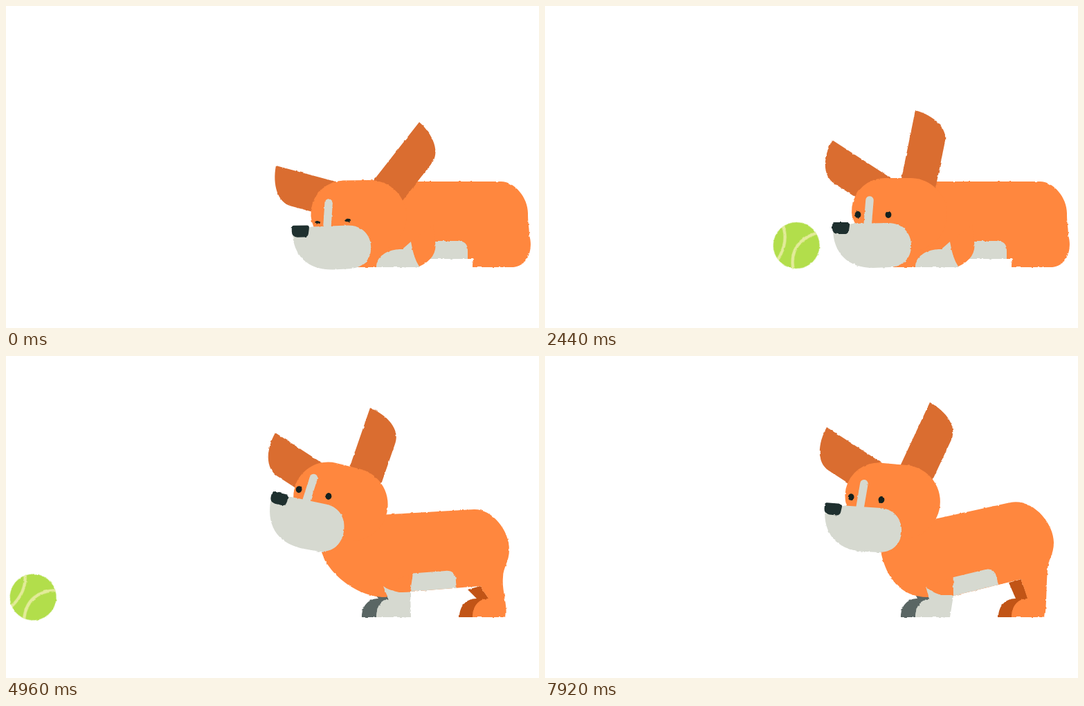
An HTML page that plays this animation: 770x466 px, repeating every 8960 ms.

```html
<!DOCTYPE html>
<html lang="en">
<head>
<meta charset="utf-8">
<title>Dog and ball</title>
<style>
html, body { margin: 0; width: 100%; height: 100%; overflow: hidden; background: #fff; }
svg { display: block; width: 100vw; height: 100vh; }
</style>
</head>
<body>
<svg viewBox="0 0 770 466">
  <defs>
    <filter id="rough" filterUnits="userSpaceOnUse" x="0" y="0" width="770" height="466" color-interpolation-filters="sRGB">
      <feTurbulence type="fractalNoise" baseFrequency=".16" numOctaves="2" seed="4" result="n"/>
      <feDisplacementMap in="SourceGraphic" in2="n" scale="2.5" xChannelSelector="R" yChannelSelector="G"/>
    </filter>
    <clipPath id="disc"><circle r="33.5"/></clipPath>
    <path id="ear" fill="#da6d30" d="M0 0C28 2 51 16 51 36V128H0Z"/>
  </defs>
  <g filter="url(#rough)">
    <path id="farFore" fill="#5a6664"/>
    <path id="farHind" fill="#c15416"/>
    <path id="body" fill="#ff873e"/>
    <path id="patch" fill="#d6d9d0" d="M0 0L6 -26H53Q67 -26 67 -12V0Z"/>
    <path id="leg" fill="#d6d9d0"/>
    <path id="arm" fill="#ff873e"/>
    <use id="ear1" href="#ear"/>
    <use id="ear2" href="#ear"/>
    <g id="head">
      <path id="skull" fill="#ff873e"/>
      <path d="M-27 -21L-30 16" stroke="#d6d9d0" stroke-width="11.5" stroke-linecap="round"/>
      <path id="muzzle" fill="#d6d9d0" d="M-80 8L-52 1L0 0C20 0 33 14 33 33C33 52 20 63 2 64L-22 65C-58 65 -80 44 -80 8Z"/>
      <path fill="#1f302f" d="M-78 11H-59Q-55 11 -56 16L-57 23Q-58 28 -63 28H-73Q-81 27 -81 20V15Q-81 11 -78 11Z"/>
      <ellipse id="eye1" cx="-44" fill="#14211f"/>
      <ellipse id="eye2" fill="#14211f"/>
    </g>
    <g id="ball">
      <circle r="33.5" fill="#b2de4b"/>
      <path clip-path="url(#disc)" fill="none" stroke="#e3eb9a" stroke-width="4.2" d="M-16 -31Q12 -2 -14 32M10 -33Q12 0 35 14"/>
    </g>
  </g>
</svg>
<script>
const LOOP = 8960, STEP = 40, GROUND = 378, KICK = 4520;

// Joints of each pose; everything else follows from them.
// head: x, y, angle, turn down, muzzle depth, eyes open; ears: tip x, y, angle
const rest = {
  lie: [0], nape: [540, 241], back: [672, 212], rump: [735, 270],
  groin: [688, 323], belly: [590, 347],
  arm: [550, 333], elbow: [572, 346], pit: [589, 346],
  head: [486, 208, 5, 0, 1, 1], ear1: [407, 103, -57], ear2: [556, 67, 25]
};
const look = { ...rest,
  back: [678, 211], rump: [742, 272], groin: [692, 322],
  head: [487, 215, 4, 0, .97, 1], ear1: [401, 115, -61], ear2: [544, 68, 19]
};
const kick = { ...rest,
  nape: [540, 230], back: [675, 222], rump: [727, 280], groin: [685, 333], belly: [584, 341],
  arm: [545, 333], elbow: [568, 342], pit: [584, 341],
  head: [466, 203, 13, -.15, 1.08, 1], ear1: [389, 111, -57], ear2: [526, 75, 19]
};
const dig = { ...rest,
  nape: [540, 245], back: [680, 196], rump: [762, 265], groin: [704, 316], belly: [615, 340],
  arm: [573, 328], elbow: [597, 358], pit: [618, 314],
  head: [516, 313, -41.4, 1, .62, 1], ear1: [528, 182, 39], ear2: [597, 167, 53]
};
const sniff = { ...rest,
  back: [680, 230], rump: [750, 295], groin: [706, 346], belly: [598, 347],
  arm: [575, 334], elbow: [600, 363], pit: [614, 322],
  head: [494, 271, 5, 0, .96, 1], ear1: [441, 222, -78], ear2: [669, 214, 81]
};
const sleep = {
  lie: [1], nape: [540, 254], back: [715, 254], rump: [754, 300],
  groin: [674, 366], belly: [600, 366],
  arm: [585, 341], elbow: [597, 377], pit: [620, 341],
  head: [493.5, 305.5, -1, 0, .98, 0], ear1: [390, 231, -75], ear2: [597, 168, 38]
};
const alert = { ...sleep,
  head: [496, 302, 0, 0, 1, 1], ear1: [415, 194, -57], ear2: [535, 151, 11.5]
};

const ACTS = [
  [0, sleep], [840, sleep], [1400, alert], [2640, alert], [3180, sniff], [3600, sniff],
  [4360, dig], [4480, dig], [4880, kick], [5400, kick], [6060, look], [6120, look], [7600, rest]
];

const $ = id => document.getElementById(id);
const set = (id, attrs) => { for (const k in attrs) $(id).setAttribute(k, attrs[k]); };
const mix = (a, b, u) => a + (b - a) * u;
const ease = u => u * u * (3 - 2 * u);
const clamp = u => Math.min(1, Math.max(0, u));
const place = (id, x, y, angle, sx = 1) =>
  set(id, { transform: `translate(${x} ${y}) rotate(${angle}) scale(${sx} 1)` });

function poseAt(t) {
  const i = Math.max(1, ACTS.findIndex(([at]) => at > t));
  const last = t >= ACTS[ACTS.length - 1][0];
  const [[t0, a], [t1, b]] = last ? ACTS.slice(-2) : ACTS.slice(i - 1, i + 1);
  const u = ease(clamp((t - t0) / (t1 - t0))), pose = {};
  for (const part in a) pose[part] = a[part].map((v, k) => mix(v, b[part][k], u));
  return pose;
}

// Curve from the sole corner over the toes to the ankle
const toe = (x, ax, ay) =>
  `${x} ${GROUND}C${x} ${mix(GROUND, ay, .6)} ${mix(x, ax, .4)} ${ay} ${ax} ${ay}`;

// Outline around two circles, the second one larger
function hull(x1, y1, r1, x2, y2, r2) {
  const mid = Math.atan2(y2 - y1, x2 - x1);
  const half = Math.acos((r1 - r2) / Math.hypot(x2 - x1, y2 - y1));
  const on = (x, y, r, a) => `${x + r * Math.cos(a)} ${y + r * Math.sin(a)}`;
  return `M${on(x1, y1, r1, mid + half)}A${r1} ${r1} 0 0 1 ${on(x1, y1, r1, mid - half)}` +
    `L${on(x2, y2, r2, mid - half)}A${r2} ${r2} 0 1 1 ${on(x2, y2, r2, mid + half)}Z`;
}

function drawBody({ lie: [lie], nape, back, rump, groin, belly, head }, chest) {
  const [bx, by] = back, [rx, ry] = rump;
  const slope = (by - nape[1]) / (bx - nape[0]), reach = (rx - bx) / 2;
  const hx = rx - 9 + 11 * lie, hy = ry + 40 - 8 * lie;
  const heel = 722 + 11 * lie;

  const tilt = head[2] * Math.PI / 180, cos = Math.cos(tilt), sin = Math.sin(tilt);
  const tx = head[0] + 6 * cos - 76 * sin;
  const ty = Math.min(chest[1], head[1] + 6 * sin + 76 * cos);

  set("body", { d: `M${nape}L${back}
    C${bx + reach} ${by + slope * reach} ${rx} ${(by + ry) / 2} ${rump}
    C${rx} ${ry + 18} ${hx} ${hy - 14} ${hx} ${hy}
    C${hx - 2 + 8 * lie} ${hy + 20} ${heel + 3 + 18 * lie} ${360 + 16 * lie} ${heel} ${GROUND}
    L${toe(674, 697 - 21 * lie, 351 + 15 * lie)}L${groin}L${belly}L${chest}
    C${chest[0] - 38} ${chest[1]} ${tx + 8} ${Math.min(chest[1], ty + 38)} ${tx} ${ty}
    L${tx - 30} ${ty - 45}Z` });
}

function drawLegs({ lie: [lie], groin: [gx, gy], belly, arm, elbow, pit }) {
  const [ax, ay] = arm, [ex, ey] = elbow, [px, py] = pit;
  const sway = (ax - 550) / 2;
  set("farFore", { d: `M${toe(514, 538, 351)}L${534 + sway} 343L566 345L560 352L550 ${GROUND}Z` });
  set("farHind", { d: `M${toe(655, 680, 351)}L${gx - 18} ${gy + 5}L${gx} ${gy}L698 352L692 ${GROUND}Z`,
    transform: `translate(${40 * lie} 0)` });
  set("leg", { d: `M${toe(535, 555 + sway, 352)}L${arm}L${belly}L${585 + 12 * lie} ${GROUND}Z` });
  set("arm", { d: `M${arm}Q${mix(ax, ex, .3)} ${mix(ay, ey, .65)} ${elbow}
    Q${px + 4} ${mix(ey, py, .35)} ${pit}L${px - 3} ${py - 25}Z` });
}

function drawHead({ head: [x, y, angle, turn, depth, open], ear1, ear2 }) {
  place("ear1", ...ear1, mix(-1, 1, clamp(turn)));
  place("ear2", ...ear2);
  place("head", x, y, angle);
  set("skull", { d: hull(mix(-5, -35, turn), mix(-5, -45, turn), mix(48, 33, turn),
    mix(32, 15, turn), mix(0, -27, turn), mix(53, 54, turn)) });
  set("muzzle", { transform: `translate(0 12) scale(1 ${depth})` });
  const size = 1 - .4 * clamp(turn);
  [7, 4.5].forEach((droop, i) => set("eye" + (i + 1),
    { cy: droop * (1 - open), rx: 4.4 * size, ry: mix(2.3, 4.9, open) * size }));
}

function drawDog(pose) {
  const [ax, ay] = pose.arm, lie = pose.lie[0];
  const chest = [ax + 3, ay + 16 + 21 * lie];
  const [gx, gy] = pose.groin, [bx, by] = pose.belly;
  drawBody(pose, chest);
  drawLegs(pose);
  drawHead(pose);
  place("patch", bx, by, Math.atan2(gy - by, gx - bx) * 180 / Math.PI);
}

// Each bounce keeps the same share of the time in the air
function ballY(t) {
  let from = 560, air = 880;
  while (t >= from + air && air > 60) { from += air; air *= .68; }
  const u = clamp((t - from) / air);
  return 349 - 4 * 230 * (air / 880) ** 2 * u * (1 - u);
}

function drawBall(t) {
  const x = 462 - 257 * Math.exp((1600 - Math.min(t, KICK)) / 879);
  const away = .94 * Math.max(0, t - KICK);
  place("ball", x - away, ballY(t), 1.36 * (x - 205) - 1.13 * away);
}

const start = performance.now();
function tick() {
  const t = Math.floor((performance.now() - start) % LOOP / STEP) * STEP;
  drawDog(poseAt(t));
  drawBall(t);
  requestAnimationFrame(tick);
}
tick();
</script>
</body>
</html>
```
